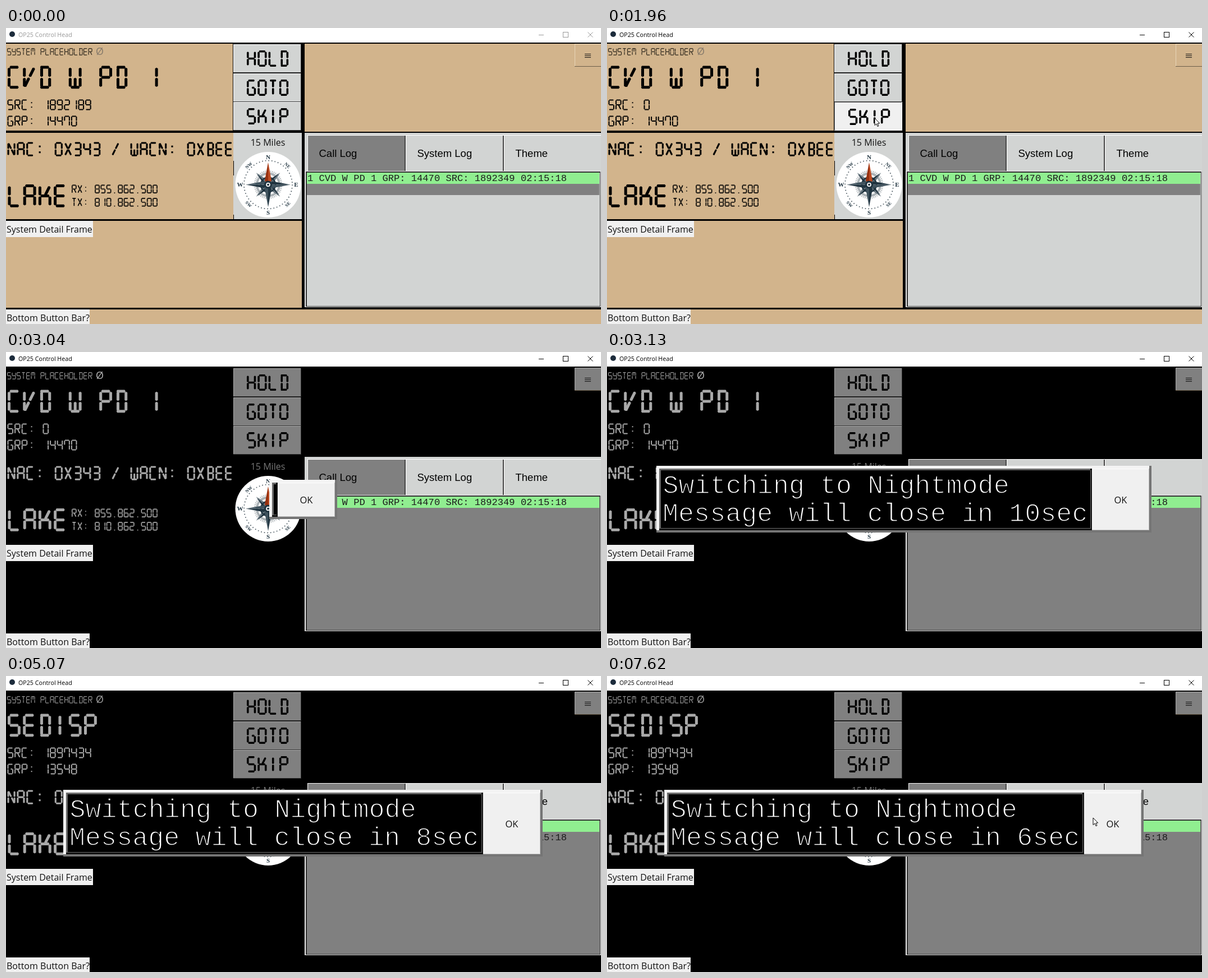
These frames come from a looping animation (1060 px wide and 528 px high, 8 s). An HTML page with a canvas:

```html
<!DOCTYPE html>
<html lang="en">
<head>
<meta charset="utf-8">
<title>OP25 Control Head</title>
<style>
html, body { margin: 0; width: 100%; height: 100%; overflow: hidden; background: #000; }
canvas { display: block; }
</style>
</head>
<body>
<canvas id="stage" width="1060" height="528"></canvas>
<script>
const ctx = document.getElementById('stage').getContext('2d');
const LOOP = 8000;
const UI = '"Open Sans", "Noto Sans", sans-serif';
const SANS = '"Liberation Sans", Arial, sans-serif';
const MONO = '"Liberation Mono", monospace';
const SERIF = '"Liberation Serif", serif';
const TAN = '#d2b48c', LIGHT = '#d2d4d3', GREY = '#808080', PALE = '#f0f0f0', GREEN = '#90ee90';

// Segment display: each pair joins two nodes of a 3 x 3 grid, numbered by rows.
// Nodes 9, a and b form an extra column, slightly inset from the left.
const GLYPHS = {
  A: '020336255835', B: '029aab25586835', C: '02033668', D: '029aab255868', E: '0203366835',
  G: '020336685845', H: '0336255835', I: '1447', K: '0336354258', L: '033668',
  M: '020336142558', N: '033604482558', O: '020336255868', P: '0203362535', R: '020336253548',
  S: '0203355868', T: '021447', V: '03362446', W: '033668582547', X: '04244648', Y: '0335255868',
  0: '020336255868', 1: '2558', 2: '0225353668', 3: '0225355868', 4: '03352558', 5: '0203355868',
  6: '020336355868', 7: '03022558', 8: '02033625583568', 9: '020335255868', '/': '2446'
};

// Cursor runs: start, end of motion, steps, from x, y, to x, y, time it leaves.
const RUNS = [
  [500, 730, 4, 857, 470, 679, 249, 900],
  [900, 1660, 11, 664, 238, 477, 161, 2420],
  [2420, 2652, 4, 488, 190, 603, 503, 2730],
  [6770, 6850, 2, 731, 497, 731, 497, 6850],
  [7310, 7620, 5, 833, 312, 866, 253, LOOP]
];

function box(x, y, w, h, color) {
  ctx.fillStyle = color;
  ctx.fillRect(x, y, w, h);
}

function bevel(x, y, w, h, fill, light, dark, b = 1) {
  box(x, y, w, h, dark);
  box(x, y, w - b, h - b, light);
  box(x + b, y + b, w - 2 * b, h - 2 * b, fill);
}

function text(str, x, y, font, color = '#111', align = 'left') {
  ctx.font = font;
  ctx.fillStyle = color;
  ctx.textAlign = align;
  ctx.fillText(str, x, y);
}

// Trims the outlines with the background colour for a light typewriter face.
function thinText(str, x, y, font, color, back, trim) {
  text(str, x, y, font, color);
  ctx.strokeStyle = back;
  ctx.lineWidth = trim;
  ctx.lineJoin = 'round';
  ctx.strokeText(str, x, y);
  ctx.lineJoin = 'miter';
}

function line(points, color, width = 1) {
  ctx.strokeStyle = color;
  ctx.lineWidth = width;
  ctx.beginPath();
  points.forEach(([x, y]) => ctx.lineTo(x, y));
  ctx.stroke();
}

function polygon(points, color) {
  ctx.fillStyle = color;
  ctx.beginPath();
  points.forEach(([x, y]) => ctx.lineTo(x, y));
  ctx.closePath();
  ctx.fill();
}

function disc(x, y, r, color) {
  ctx.fillStyle = color;
  ctx.beginPath();
  ctx.arc(x, y, r, 0, 7);
  ctx.fill();
}

function ring(x, y, r, color, width, dash = []) {
  ctx.strokeStyle = color;
  ctx.lineWidth = width;
  ctx.setLineDash(dash);
  ctx.beginPath();
  ctx.arc(x, y, r, 0, 2 * Math.PI);
  ctx.stroke();
  ctx.setLineDash([]);
}

function bar([ax, ay], [bx, by], half) {
  const len = Math.hypot(bx - ax, by - ay);
  const ux = (bx - ax) / len, uy = (by - ay) / len, gap = half * 0.3;
  const at = (d, side) => [ax + ux * d - uy * side, ay + uy * d + ux * side];
  const end = len - gap, s = half * 0.6;
  polygon([at(gap, 0), at(gap + s, half), at(end - s, half), at(end, 0),
    at(end - s, -half), at(gap + s, -half)], ctx.fillStyle);
}

function segments(str, x, y, pitch, color, weight = 0.185) {
  const half = pitch * weight / 2, w = pitch * 0.84 - 2 * half, h = pitch * 1.5 - 2 * half;
  ctx.fillStyle = color;
  [...str].forEach((ch, i) => {
    const left = x + i * pitch + half, top = y + half;
    const node = id => {
      const n = parseInt(id, 16);
      return n < 9 ? [left + w * (n % 3) / 2, top + h * Math.floor(n / 3) / 2]
        : [left + w * 0.2, top + h * (n - 9) / 2];
    };
    const dot = f => ctx.fillRect(left + w / 2 - half, top + h * f - half, half * 2, half * 2);
    if (ch === ':') { dot(0.28); dot(0.75); }
    if (ch === '.') dot(1);
    for (const [a, b] of (GLYPHS[ch] || '').match(/../g) || []) bar(node(a), node(b), half);
  });
}

function titleBar(active) {
  const ink = active ? '#000' : '#999';
  box(0, 0, 1060, 26, '#fff');
  disc(11, 11, 5, '#1d2c3c');
  text('OP25 Control Head', 22, 16, '10.7px ' + UI, ink);
  line([[949, 12.5], [958, 12.5]], ink);
  ctx.strokeRect(992.5, 7.5, 9, 9);
  line([[1036.5, 7.5], [1045.5, 16.5]], ink);
  line([[1045.5, 7.5], [1036.5, 16.5]], ink);
}

function compass() {
  const navy = '#203440', red = '#96300f';
  ctx.save();
  ctx.translate(467, 279.5);
  disc(0, 0, 58.5, '#fff');
  ring(0, 0, 43, '#4a5860', 1.8, [1.6, 4.03]);
  ring(0, 0, 24, '#b4babd', 3, [1.5, 1.64]);
  ring(0, 0, 20, '#aab1b5', 4);
  const spike = (angle, length, width, dark, light) => {
    ctx.save();
    ctx.rotate(angle);
    polygon([[0, 0], [-width, -width * 1.2], [0, -length]], dark);
    polygon([[0, 0], [width, -width * 1.2], [0, -length]], light);
    ctx.restore();
  };
  for (let i = 0; i < 4; i++) spike((i + 0.5) * Math.PI / 2, 30, 5, navy, '#687780');
  ring(0, 0, 13, navy, 2.5);
  for (let i = 0; i < 4; i++) {
    spike(i * Math.PI / 2, 40, 6, i ? navy : red, i ? '#40535e' : '#bd4b22');
  }
  disc(0, 0, 7, navy);
  disc(0, 0, 3.8, '#fff');
  disc(0, 0, 2, navy);
  ['N', 'E', 'S', 'W'].forEach((name, i) => {
    const a = i * Math.PI / 2;
    text(name, 50 * Math.sin(a), 3.5 - 49.5 * Math.cos(a), 'bold 11px ' + SERIF, navy, 'center');
  });
  ['NE', 'SE', 'SW', 'NW'].forEach((name, i) => {
    ctx.save();
    ctx.rotate((i + 0.5) * Math.PI / 2);
    ctx.translate(0, -49);
    if (i === 1 || i === 2) ctx.rotate(Math.PI);
    text(name, 0, 3, 'bold 8px ' + SERIF, navy, 'center');
    ctx.restore();
  });
  ctx.restore();
}

function leftSide(t, night) {
  const panel = night ? '#000' : TAN, ink = night ? '#a9a9a9' : '#000';
  const button = night ? GREY : LIGHT;
  const later = t >= 4210;
  box(0, 28, 404, 155, panel);
  box(0, 187, 405, 154, panel);
  box(0, 344, 527, 155, panel);
  box(0, 502, 1060, 26, panel);
  box(406, 187, 121, 154, night ? '#000' : LIGHT);
  if (!night) {
    box(405, 187, 1, 50, LIGHT);
    box(405, 263, 1, 70, LIGHT);
  }

  segments('SYSTEM PLACEHOLDER', 2, 36, 8.5, night ? '#999' : '#292319', 0.14);
  const bright = t < 3430 || (t >= 6080 && t < 6310);
  text('Ø', 160, 48, '18px ' + UI, night ? (bright ? '#b8b8b8' : '#a0a0a0') : '#85796a');
  segments(t < 3680 ? 'CVD W PD 1' : 'SEDISP', 3, 67.5, 27.2, ink);
  const source = later ? '1897434' : t < 580 ? '1892189' : '0';
  segments('SRC: ' + source, 2.5, 127.5, 12.6, ink, 0.16);
  segments('GRP: ' + (later ? '13548' : '14470'), 2.5, 156.5, 12.6, ink, 0.16);
  segments('NAC: 0X343 / WACN: 0XBEE', 2.5, 203.5, 16.85, ink);
  segments('LAKE', 3.5, 279, 27.2, ink);
  segments('RX: 855.862.500', 117, 279.5, 10.3, ink, 0.16);
  segments('TX: 810.862.500', 117, 303, 10.3, ink, 0.16);

  ['HOLD', 'GOTO', 'SKIP'].forEach((label, i) => {
    const y = Math.round(29 + i * 51.5), down = label === 'SKIP' && t >= 1810 && t < 2190;
    const edges = down ? ['#777', '#fff'] : [night ? '#aaa' : '#fff', '#333'];
    bevel(405, y, 121, 51, down ? PALE : button, ...edges);
    segments(label, 429 + down, y + 11 + down, 19.3, '#000');
  });

  text('15 Miles', 466.5, 210, '16px ' + UI, night ? '#777' : '#111', 'center');
  compass();
  box(0, 344, 155, 29, PALE);
  text('System Detail Frame', 1, 365, '16px ' + UI);
  box(0, 502, 149, 26, PALE);
  text('Bottom Button Bar?', 1, 523, '16px ' + UI);
}

function rightSide(t, night) {
  const panel = night ? '#000' : TAN;
  box(532, 28, 528, 157, panel);
  bevel(1013, 28, 48, 41, night ? GREY : TAN, night ? '#aaa' : '#e8d6b8', '#6b5d49');
  for (let y = 46; y < 54; y += 3) box(1031, y, 11, 1, '#111');

  box(532, 187, 528, 311, t >= 3130 ? '#000' : LIGHT);
  [['Call Log', 537], ['System Log', 712], ['Theme', 887]].forEach(([label, x], i) => {
    box(x, 191, 175, 64, '#fff');
    box(x + 1, 192, 174, 63, i ? LIGHT : GREY);
    box(x + 173, 192, 2, 63, '#444');
    text(label, x + 20.5, 230, '18.5px ' + SANS, '#000');
  });

  box(532, 255, 528, 243, '#eee');
  box(534, 256, 525, 241, '#333');
  box(536, 258, 522, 238, night ? GREY : LIGHT);
  box(536, 258, 521, 20, GREEN);
  if (!night) box(536, 278, 521, 20, GREY);
  text('1 CVD W PD 1 GRP: 14470 SRC: 1892349 02:15:18', 537, t < 3980 ? 273 : 293,
    '17.13px ' + MONO, '#1c1c1c');
}

function dialog(t) {
  const small = t < 3130;
  const seconds = t < 4060 ? 10 : t < 5070 ? 9 : t < 6080 ? 8 : t < 7080 ? 7 : 6;
  const x = small ? 469 : seconds > 9 ? 88 : 102;
  const y = small ? 228 : 203, h = small ? 70 : 119;
  const width = small ? 121 : 1058 - 2 * x;
  bevel(x, y, width, h, PALE, '#f4f4f4', '#757575', 4);
  const inner = x + 5, top = y + 5, tall = h - 9;
  const okX = x + width - 106;
  bevel(inner, top, okX - inner, tall, '#000', '#696969', '#111', 3);
  box(inner + 3, top + tall - 4, okX - inner - 5, 1, '#666');
  if (!small) box(okX - 3, top + 3, 1, tall - 6, '#666');
  bevel(okX, top, 102, tall, PALE, '#fff', '#bbb');
  text('OK', okX + 51, y + (small ? 42 : 67), '16.5px ' + UI, '#111', 'center');
  if (small) return;
  const face = ['46.75px ' + MONO, '#fff', '#000', 1.7];
  thinText('Switching to Nightmode', x + 11.5, 252, ...face);
  thinText(`Message will close in ${seconds}sec`, x + 11, 302, ...face);
}

function cursor(t) {
  const run = RUNS.find(r => t >= r[0] && t < r[7]);
  if (!run) return;
  const [start, end, steps, x0, y0, x1, y1] = run;
  const last = steps - 1;
  const p = Math.min(last, Math.floor((t - start) / (end - start) * last + 1e-6)) / last;
  const ease = p * (1.4 - 0.4 * p);
  ctx.save();
  ctx.translate(x0 + (x1 - x0) * ease, y0 + (y1 - y0) * ease);
  const arrow = [[0, 0], [0, 12.6], [3, 9.9], [5, 14.6], [7, 13.7], [5, 9.2], [8.7, 9], [0, 0]];
  polygon(arrow, '#fff');
  line(arrow, '#000', 1);
  ctx.restore();
}

function draw() {
  const t = performance.now() % LOOP, night = t >= 3040;
  box(0, 0, 1060, 528, '#000');
  titleBar(t >= 1810);
  leftSide(t, night);
  rightSide(t, night);
  if (night) dialog(t);
  cursor(t);
  requestAnimationFrame(draw);
}

draw();
</script>
</body>
</html>
```
